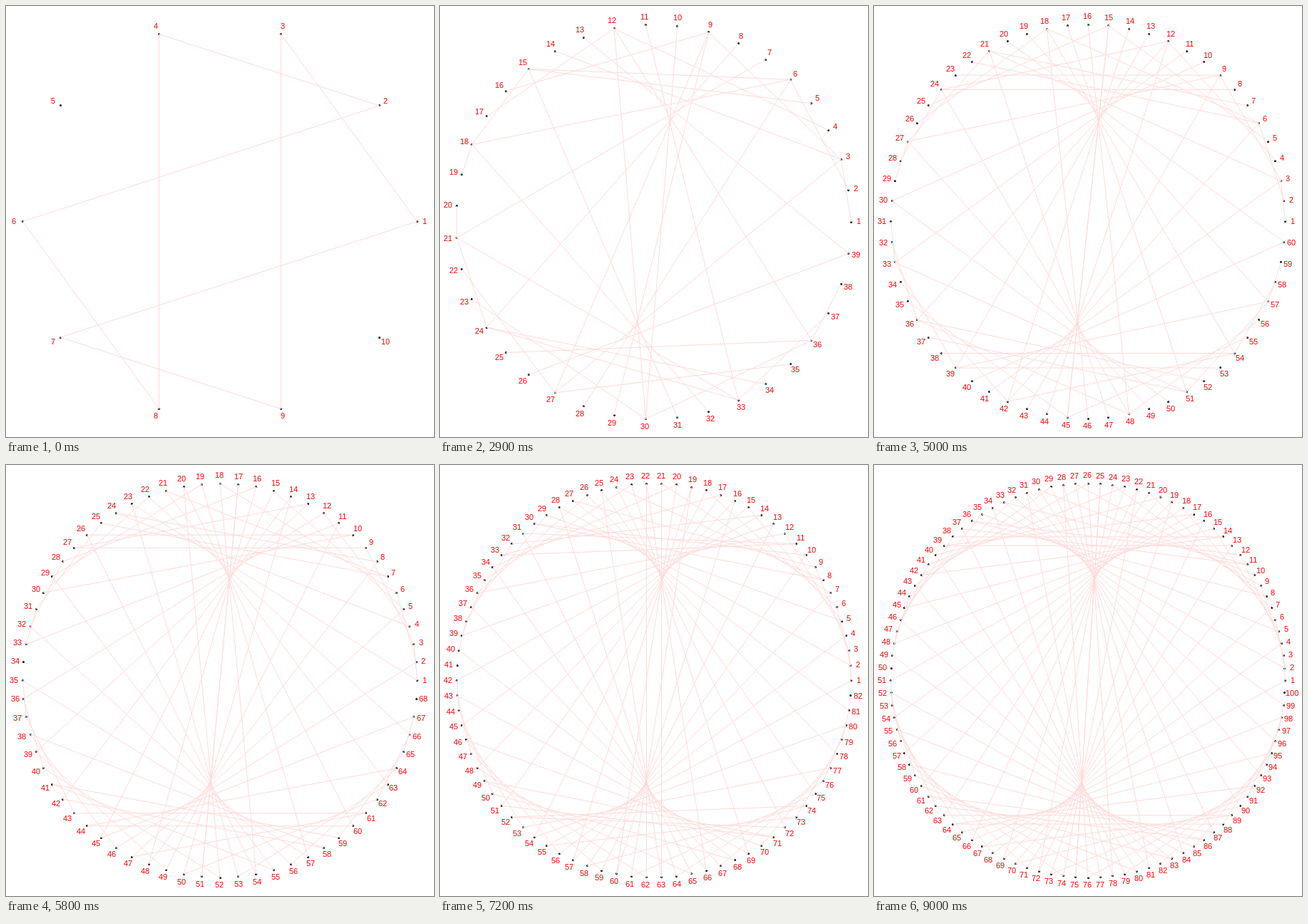
An HTML page that plays this animation: 600 px wide and 605 px high, repeating every 9100 ms.

```html
<!DOCTYPE html>
<html lang="en">
<head>
<meta charset="utf-8">
<title>Times-three circle</title>
<style>
  html, body { margin: 0; width: 100%; height: 100%; overflow: hidden; background: #fff; }
  svg { display: block; width: 600px; height: 605px; }
  path { fill: none; stroke: #ffdada; stroke-width: 1; }
  text { fill: #f00; font: 11px "Liberation Sans", Arial, sans-serif; }
</style>
</head>
<body>
<svg viewBox="0 0 600 605">
  <g id="dots"></g>
  <path id="chords"/>
  <g id="labels"></g>
</svg>
<script>
const FIRST = 10, LAST = 100, STEP = 100;
const LEFT = 23.5, RIGHT = 576.5, LABEL = 1.04;
const [dots, chords, labels] = ['dots', 'chords', 'labels'].map(id => document.getElementById(id));

const snap = v => Math.floor(v + 0.01) + 0.5;

// The circle is scaled so that its outermost points span LEFT to RIGHT.
function layout(n) {
  const odd = n % 2;
  const radius = (RIGHT - LEFT) / (1 + (odd ? Math.cos(Math.PI / n) : 1));
  const cx = RIGHT - radius, cy = odd ? 303 : 302.5;
  return (k, scale = 1) => {
    const a = 2 * Math.PI * (k - 1) / n;
    return [cx + radius * scale * Math.cos(a), cy - radius * scale * Math.sin(a)];
  };
}

function draw(n) {
  const at = layout(n);
  let dotMarkup = '', labelMarkup = '', lines = '';
  for (let k = 1; k <= n; k++) {
    const [x, y] = at(k);
    dotMarkup += `<circle cx="${snap(x)}" cy="${snap(y)}" r="1.5"/>`;

    const end = 3 * k % n || n;
    if (end !== k) lines += `M${at(k).map(v => v.toFixed(2))}L${at(end).map(v => v.toFixed(2))}`;

    const [lx, ly] = at(k, LABEL);
    const left = Math.round(lx - 1 - 3 * String(k).length);
    labelMarkup += `<text x="${left}" y="${Math.round(ly + 3.4)}">${k}</text>`;
  }
  dots.innerHTML = dotMarkup;
  chords.setAttribute('d', lines);
  labels.innerHTML = labelMarkup;
}

const count = LAST - FIRST + 1;
let start, shown;

function tick(now) {
  start ??= now;
  const n = FIRST + Math.floor((now - start) / STEP) % count;
  if (n !== shown) draw(shown = n);
  requestAnimationFrame(tick);
}

draw(shown = FIRST);
requestAnimationFrame(tick);
</script>
</body>
</html>
```
